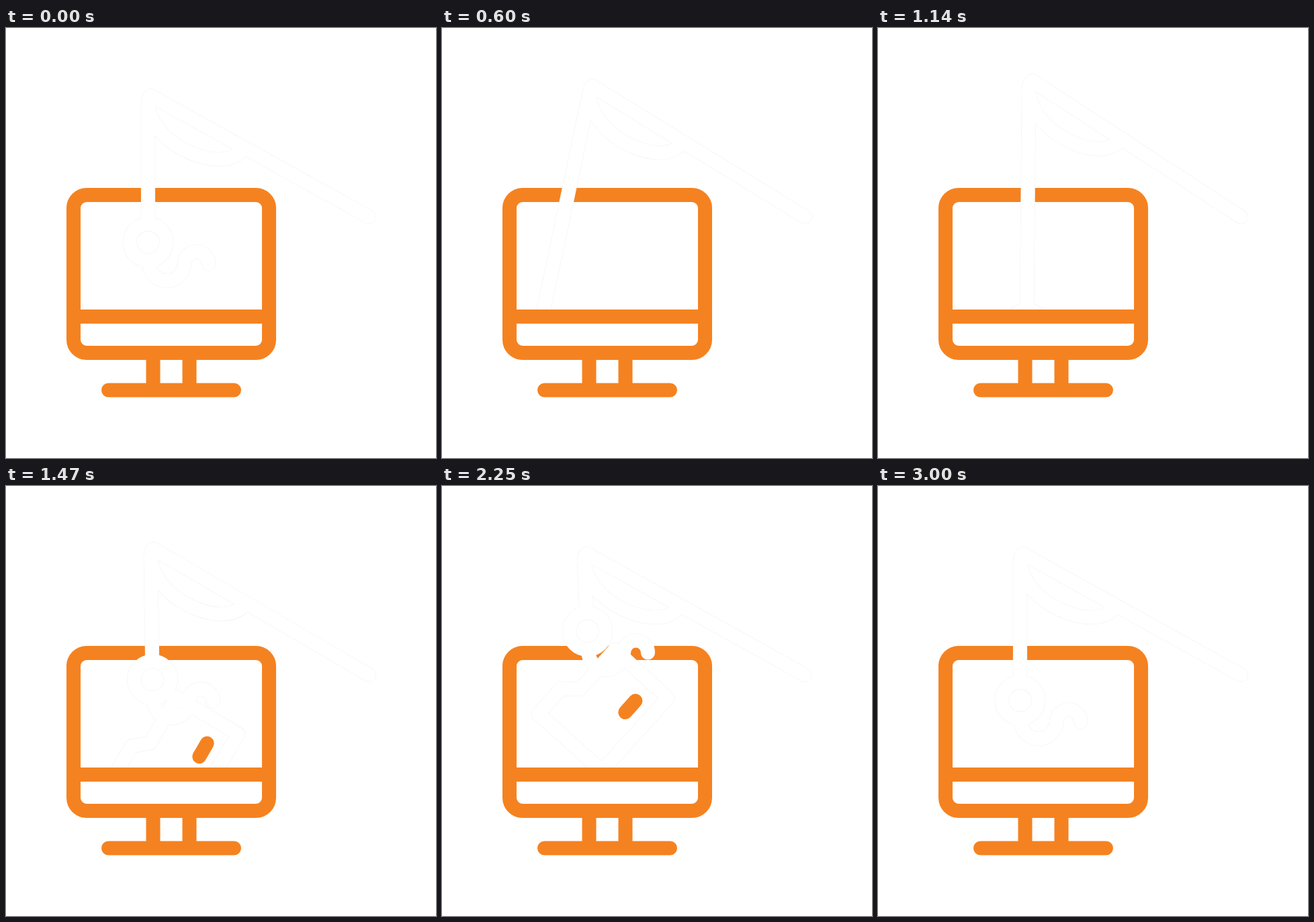
These frames come from a looping animation (640 by 640 pixels, 3.03 s). An HTML page:

```html
<!DOCTYPE html>
<html lang="en">
<head>
<meta charset="utf-8">
<title>Phishing</title>
<style>
  html, body { margin: 0; width: 100%; height: 100%; overflow: hidden; background: #fff; }
  svg { display: block; width: 100vw; height: 100vh; }
  path, circle { fill: none; stroke-linecap: round; stroke-linejoin: round; }
</style>
</head>
<body>
<svg viewBox="0 0 640 640">
  <defs>
    <clipPath id="aboveBar"><rect width="640" height="419"/></clipPath>
    <g id="tackle">
      <g id="rod">
        <path d="M540 281L215.5 101Q211.5 104 211.5 111C214 160 275 195.5 317 195.5Q337 195.5 350 184"/>
      </g>
      <g clip-path="url(#aboveBar)">
        <path id="line"/>
        <g id="hook">
          <circle r="27.2"/>
          <path d="M1.5 33A26.3 26.3 0 0 0 54 32A18 18 0 0 1 90 32"/>
        </g>
        <g id="folder">
          <path d="M252.4 242.3L344 297L269.5 423L160 358.5L185.5 315L213.5 310Z"/>
        </g>
      </g>
    </g>
  </defs>

  <g stroke="#f58220" stroke-width="21">
    <rect x="100.5" y="248.5" width="291" height="235" rx="19.5" fill="none"/>
    <path d="M101 429.5H391M219 484V539M273 484V539M152.5 539H339.5"/>
  </g>
  <use href="#tackle" stroke="#ececec" stroke-width="21.2"/>
  <use href="#tackle" stroke="#fff" stroke-width="20.5"/>
  <g clip-path="url(#aboveBar)">
    <g id="pill">
      <path d="M297.7 310.8L286.2 330.5" stroke="#f58220" stroke-width="21"/>
    </g>
  </g>
</svg>
<script>
const LOOP = 3030, STEP = 30;
const PIVOT = [540, 281], ANCHOR = [211.5, 111];
const RAISED = [216.5, 216];

// Each row: time in ms, then values interpolated linearly.
const rodKeys = [[0, 0], [1080, 4.6], [1620, 0]];
const hookKeys = [
  [0, 211.5, 319], [600, 139, 478], [1080, 222, 476],
  [1620, ...RAISED], [2300, ...RAISED], [3000, 211.5, 319]
];
const dropKeys = [[2300, 0, 0], [3000, -25, 203]];

const el = id => document.getElementById(id);
const clamp = x => Math.max(0, Math.min(1, x));

function sample(keys, t) {
  let i = 0;
  while (i < keys.length - 2 && t > keys[i + 1][0]) i++;
  const [a, b] = [keys[i], keys[i + 1]];
  const p = clamp((t - a[0]) / (b[0] - a[0]));
  return a.slice(1).map((v, k) => v + (b[k + 1] - v) * p);
}

function rotate([x, y], [cx, cy], degrees) {
  const r = degrees * Math.PI / 180, c = Math.cos(r), s = Math.sin(r);
  return [cx + (x - cx) * c - (y - cy) * s, cy + (x - cx) * s + (y - cy) * c];
}

function folderSwing(t) {
  if (t > 2250) return 11.5 * (1 - clamp((t - 2250) / 300));
  const p = clamp((t - 1710) / 540);
  return 11.5 * p * p * (3 - 2 * p);
}

function draw(t) {
  const [tilt] = sample(rodKeys, t);
  const [hx, hy] = sample(hookKeys, t);
  const [ax, ay] = rotate(ANCHOR, PIVOT, tilt);
  el('rod').setAttribute('transform', `rotate(${tilt} ${PIVOT})`);
  el('line').setAttribute('d', `M${ax} ${ay}L${hx} ${hy}`);

  // Stop the line at the top of the ring so its centre stays open.
  const reach = Math.hypot(hx - ax, hy - ay), k = 1 - 34 / reach;
  el('line').setAttribute('d', `M${ax} ${ay}L${ax + (hx - ax) * k} ${ay + (hy - ay) * k}`);
  el('line').setAttribute('stroke-linecap', 'butt');
  el('line').style.strokeLinecap = 'butt';
  el('hook').setAttribute('transform', `translate(${hx} ${hy})`);

  const [dx, dy] = t < 1620 ? [hx - RAISED[0], hy - RAISED[1]] : sample(dropKeys, t);
  const carried = `translate(${dx} ${dy}) rotate(${folderSwing(t)} 248 267)`;
  for (const id of ['folder', 'pill']) {
    el(id).setAttribute('transform', carried);
    el(id).style.display = t < 1080 ? 'none' : '';
  }
}

const start = performance.now();
function tick() {
  const t = (performance.now() - start) % LOOP;
  draw(Math.floor(t / STEP) * STEP);
  requestAnimationFrame(tick);
}
tick();
</script>
</body>
</html>
```
